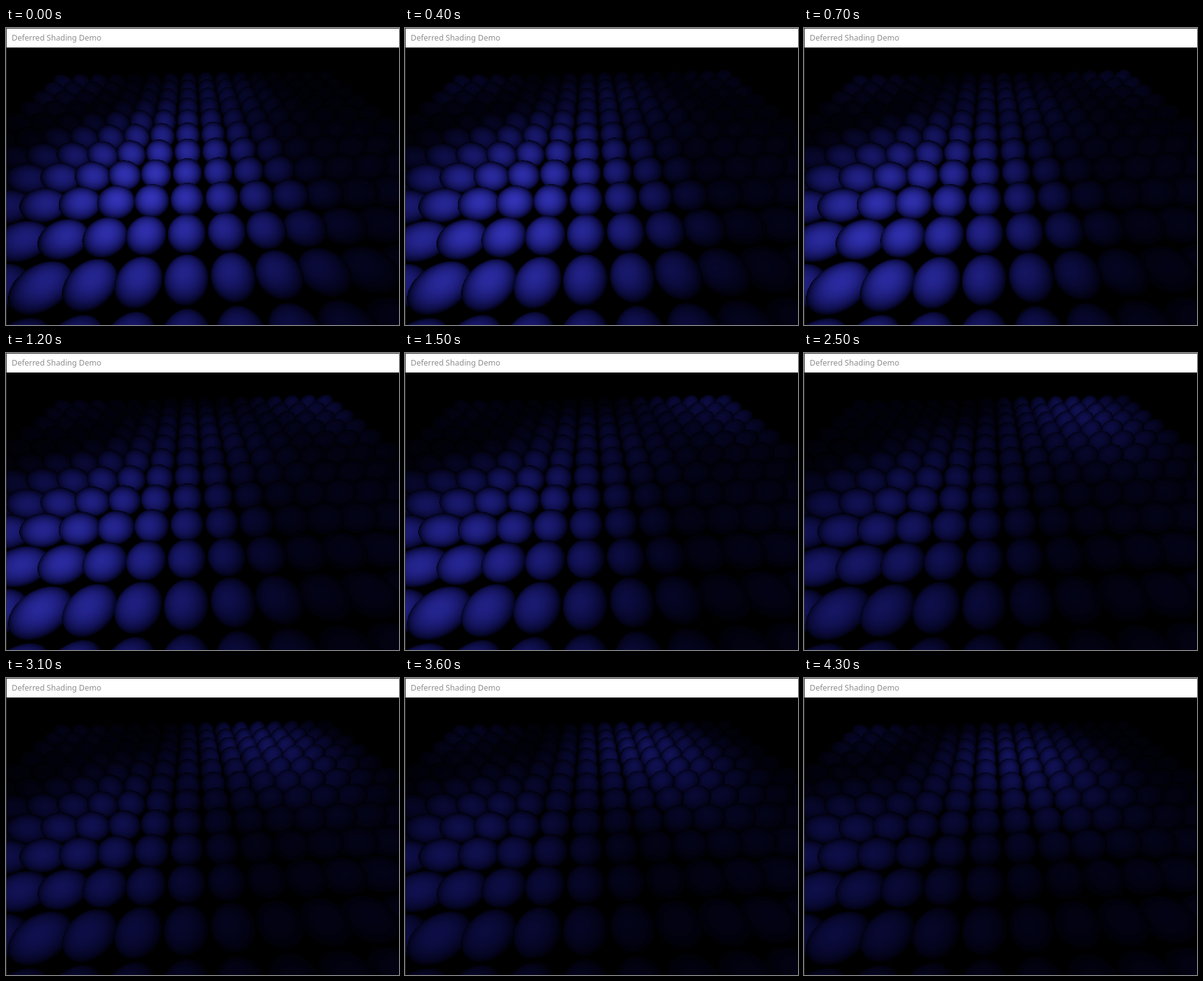
Recreate the animation shown at these times as an HTML page with a canvas. Size 624 px wide and 472 px high, loop 4400 ms.

```html
<!DOCTYPE html>
<html lang="en">
<head>
<meta charset="utf-8">
<title>Deferred Shading Demo</title>
<style>
  html, body { margin: 0; width: 100%; height: 100%; overflow: hidden; background: #000; }
  #window { position: absolute; left: 0; top: 0; width: 624px; height: 472px; background: #2b2b2b; }
  #bar {
    position: absolute; left: 1px; top: 1px; width: 623px; height: 30px; background: #fff;
    color: #8e8e8e; font: 12.5px/30px "Noto Sans", "Open Sans", sans-serif; text-indent: 8px;
  }
  canvas { position: absolute; left: 1px; top: 31px; }
</style>
</head>
<body>
<div id="window">
  <div id="bar">Deferred Shading Demo</div>
  <canvas id="view" width="623" height="441"></canvas>
</div>
<script>
const LOOP = 4400, STEP = 100;
const canvas = document.getElementById("view");
const ctx = canvas.getContext("2d");
const { width, height } = canvas;
const image = ctx.createImageData(width, height);

// Grid space: one sphere per unit, u to the right, v into the distance, h upwards.
const RADIUS = 0.48;
const COLUMNS = [-7, 8], ROWS = [-2, 10];
const AMBIENT = 0.05;
const camera = { u: 0.317, h: 4, v: -0.492, pitch: 0.934, yaw: 0.048, focal: 258, cx: 311, cy: 220 };

const mix = (from, to, k) => from + (to - from) * k;
const easeOut = k => 1 - (1 - k) ** 3;
const easeBoth = k => (1 - Math.cos(Math.PI * k)) / 2;
const within = (n, [low, high]) => n >= low && n <= high;

// The lamps above the grid at progress k (0 to 1) of the loop.
const lamps = [
  function near(k) {
    const drift = easeOut(k);
    return { u: mix(-1.2, -3.6, drift), v: mix(1.9, 0, drift), power: mix(1.2, 0.3, easeBoth(k)), reach: 6.3 };
  },
  function arriving(k) {
    return { u: mix(9, 1.2, k), v: mix(11, 5.9, k), power: 0.6 * easeOut(k), reach: 6 };
  },
  function crossing(k) {
    return { u: mix(0.8, -4.6, k * k), v: mix(7.2, 2.2, k), power: mix(0.36, 0.22, k), reach: 5.2 };
  },
  function farCorner(k) {
    return { u: -6.3, v: 9.3, power: 0.13 + 0.1 * Math.cos(2 * Math.PI * k), reach: 4.5 };
  },
  function fill() {
    return { u: 4.5, v: 1.5, power: 0.1, reach: 7 };
  }
];

function pixelRay(x, y) {
  const { pitch, yaw, focal, cx, cy } = camera;
  const right = (x + 0.5 - cx) / focal, down = (y + 0.5 - cy) / focal;
  const ahead = Math.cos(pitch) - down * Math.sin(pitch);
  return [
    right * Math.cos(yaw) + ahead * Math.sin(yaw),
    -Math.sin(pitch) - down * Math.cos(pitch),
    ahead * Math.cos(yaw) - right * Math.sin(yaw)
  ];
}

// Nearest sphere on the ray, searched only around the place where it crosses the grid plane.
// Returns the point, the normal and how far the surface faces the camera.
function hitSphere([du, dh, dv]) {
  const reach = -camera.h / dh;
  const midU = Math.round(camera.u + du * reach), midV = Math.round(camera.v + dv * reach);
  const a = du * du + dh * dh + dv * dv;
  let best = Infinity, hit = null;
  for (let v = midV - 2; v <= midV + 2; v++) {
    if (!within(v, ROWS)) continue;
    for (let u = midU - 2; u <= midU + 2; u++) {
      if (!within(u, COLUMNS)) continue;
      const ou = camera.u - u, ov = camera.v - v;
      const b = ou * du + camera.h * dh + ov * dv;
      const c = ou * ou + camera.h ** 2 + ov * ov - RADIUS ** 2;
      const disc = b * b - a * c;
      if (disc < 0) continue;
      const t = (-b - Math.sqrt(disc)) / a;
      if (t >= best) continue;
      best = t;
      const pu = ou + du * t, ph = camera.h + dh * t, pv = ov + dv * t;
      const facing = Math.sqrt(disc / a) / RADIUS;
      hit = [u + pu, ph, v + pv, pu / RADIUS, ph / RADIUS, pv / RADIUS, facing];
    }
  }
  return hit;
}

// Geometry pass: done once, as the camera stands still.
const FIELDS = 7;
const surface = new Float32Array(width * height * FIELDS);
const pixels = new Uint32Array(width * height);
let count = 0;
for (let y = 0; y < height; y++) {
  for (let x = 0; x < width; x++) {
    const offset = (y * width + x) * 4;
    image.data[offset + 3] = 255;
    const hit = hitSphere(pixelRay(x, y));
    if (!hit) continue;
    surface.set(hit, count * FIELDS);
    pixels[count++] = offset;
  }
}

// Lighting pass: mostly camera-facing shading, slightly turned towards each lamp.
function draw(time) {
  const lights = lamps.map(lamp => lamp(time / LOOP));
  const data = image.data;
  for (let i = 0, s = 0; i < count; i++, s += FIELDS) {
    const facing = surface[s + 6];
    let value = AMBIENT * facing;
    for (const { u, v, power, reach } of lights) {
      const lu = u - surface[s], lh = reach * 0.38 - surface[s + 1], lv = v - surface[s + 2];
      const d2 = lu * lu + lh * lh + lv * lv;
      const fade = 1 - d2 / (reach * reach);
      if (fade <= 0) continue;
      const toLamp = (surface[s + 3] * lu + surface[s + 4] * lh + surface[s + 5] * lv) / Math.sqrt(d2);
      value += power * fade * fade * Math.max(0, mix(facing, toLamp, 0.2));
    }
    const p = pixels[i];
    data[p] = data[p + 1] = 52 * value ** 1.4;
    data[p + 2] = 185 * value;
  }
  ctx.putImageData(image, 0, 0);
}

const start = performance.now();
let shown = -1;
function tick() {
  const time = Math.floor(((performance.now() - start) % LOOP) / STEP) * STEP;
  if (time !== shown) draw(shown = time);
  requestAnimationFrame(tick);
}
tick();
</script>
</body>
</html>
```
